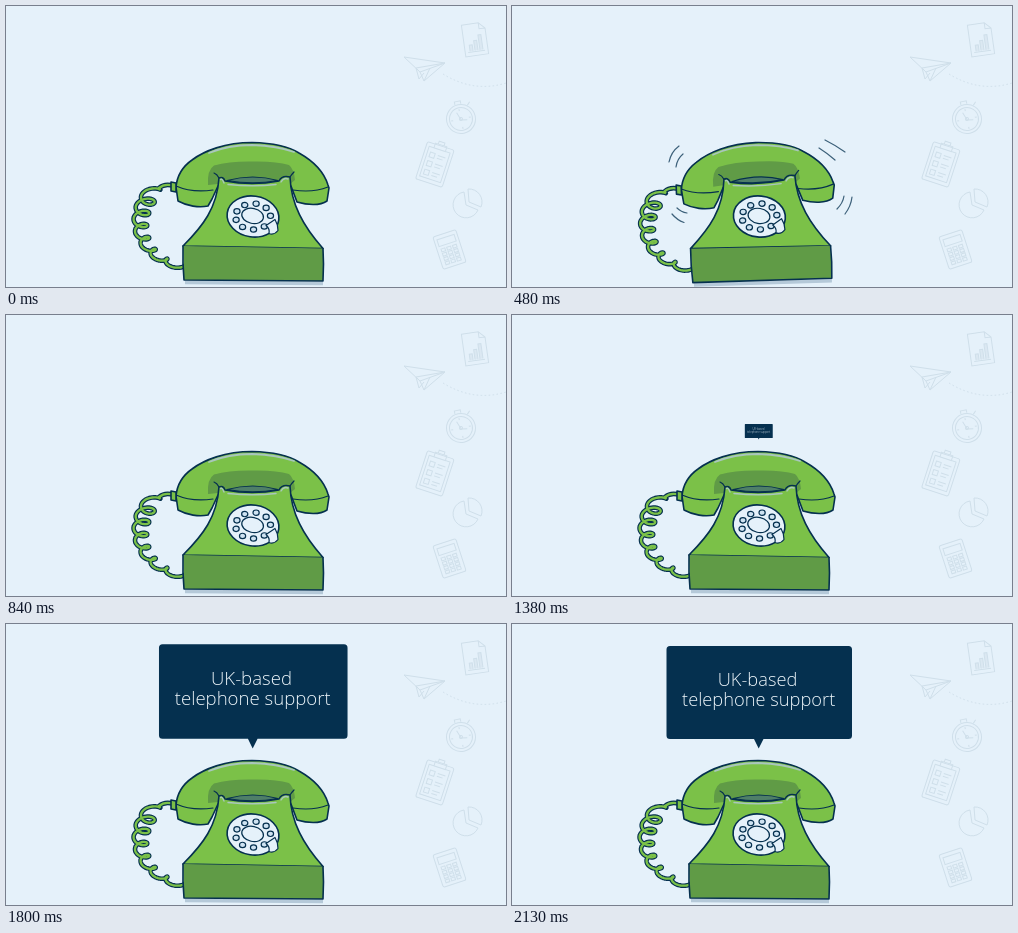
Write an HTML page that moves like this. It is 500 px wide and 281 px high and loops after 5220 ms.

```html
<!DOCTYPE html>
<html lang="en">
<head>
<meta charset="utf-8">
<title>Telephone support</title>
<style>
  html, body { margin: 0; width: 100%; height: 100%; overflow: hidden; background: #e5f1fa; }
  svg { display: block; width: 100vw; height: 100vh; }
  .icons { fill: none; stroke: #cfdfea; stroke-width: 1; }
  .ink { stroke: #05304f; stroke-width: 1.6; stroke-linejoin: round; stroke-linecap: round; }
  .thin { stroke-width: 1.2; }
  .light { fill: #7bc148; }
  .dark { fill: #609b46; }
  .pale { fill: #e5f1fa; }
  .line { fill: none; }
  .shine { fill: none; stroke: #a9c6bd; stroke-width: 1.8; stroke-linecap: round; }
  text { font: 300 18.3px "Open Sans", "Noto Sans", sans-serif; fill: #eef6fb; text-anchor: middle; }
</style>
</head>
<body>
<svg viewBox="0 0 500 281" preserveAspectRatio="none">
  <g class="icons">
    <g transform="translate(468.500 33.500) rotate(-8)">
      <path d="M-11-16H6L12-10V16H-11ZM6-16V-10H12M-8 12H9"/>
      <path d="M-6 11V5h3v6M-1 11V1h3V11M4 11V-4h3V11" fill="#dbe8f2"/>
    </g>
    <path d="M398 51L439 57L418 75L414 66ZM414 66L439 57L410 62ZM410 62L413 73L418 67M418 75L424 62"/>
    <path d="M437 68Q468 87 500 77" stroke-dasharray="1.500 2.500"/>
    <g transform="translate(455 113) rotate(-12)">
      <circle r="14.500"/><circle r="11.500"/>
      <path d="M-3-15V-18H3V-15M9-12L12-15M0 1L-3-7M0 1L6 2M0-10V-8M0 10V8M-10 0H-8M10 0H8"/>
      <circle r="1.500"/>
    </g>
    <g transform="translate(429 158) rotate(18)">
      <rect x="-14" y="-19" width="28" height="39" rx="2"/>
      <path d="M-11-15H11V16H-11ZM-6-20H6V-15H-6ZM-3-20V-23H3V-20"/>
      <path d="M-8-10h5v5h-5ZM-8-1h5v5h-5ZM-8 8h5v5h-5ZM0-9H8M0-6H6M0 0H8M0 3H6M0 9H8M0 12H6"/>
    </g>
    <path d="M460 199L458 186A13 13 0 1 0 472 204ZM463 196L462 183A13 13 0 0 1 475 201Z"/>
    <g transform="translate(443.500 243.500) rotate(-18)">
      <rect x="-12" y="-17" width="24" height="34" rx="2"/>
      <path d="M-9-13H9V-6H-9Z"/>
      <path id="keys"/>
    </g>
  </g>

  <g id="phone">
    <path d="M179 276.500L317 277.500" stroke="#b5c9d9" stroke-width="3.500"/>
    <path id="cord" class="ink line" style="stroke-width:4.600"/>
    <path id="cordFill" class="line" stroke="#7bc148" stroke-width="2.300"/>

    <path class="ink light" d="M170 181C171 170 176 161 186 154C198 145 219 136.500 246 136.500C268 137 282 140 293 147C309 156 318 166 322 179L323 182L321 195C314 200 301 199 291 196L285 180H212L206 193L202 200C193 202 181 200 172 195Z"/>
    <path class="dark" d="M202 179Q201 164 208 159.500Q224 155 247 155.500Q270 155 283 159Q288 163 289 174L284 178H212Z"/>
    <path class="ink line thin" d="M170 180Q186 187 207 184M287 184Q307 187 322 181M208 167Q211 168 213 172M288 166Q286 168 284 171"/>
    <path class="shine" d="M203 147Q222 139 246 139Q272 140 288 146"/>

    <path class="ink light" d="M213 172Q217 170 219 175Q246 180 273 175Q276 169 284 171C285 198 297 220 317 242.500L177 240C197 220 211 202 213 172Z"/>
    <path class="ink thin" fill="#4f7f68" d="M221 174.500Q247 167.500 272 174.500Q247 179 221 174.500Z"/>
    <path class="shine" d="M214.500 173.500Q216 172 218 177M275 176Q278 171 282 173M222 178.500Q247 181 270 178.500" style="stroke-width:1.400"/>
    <path class="dark" d="M177 240L317 242.500V275L178 274Z"/>
    <path class="ink line" d="M177 240Q176.500 258 178 274L317 275Q318 258 317 242.500"/>

    <g transform="translate(247 210.500)">
      <ellipse class="ink pale" rx="26" ry="20.500" transform="rotate(8)"/>
      <ellipse class="ink line thin" cx="-.5" cy="-.5" rx="11" ry="7.500" transform="rotate(12)"/>
      <g id="holes" class="ink thin" fill="#cfe3f2"></g>
      <path class="ink pale thin" d="M13 9Q19 5 22 3Q25 8 25 14Q21 19 16 17Q17 12 13 9Z"/>
    </g>
    <path class="ink light" d="M165 176L170 177V186L165 185Z"/>
  </g>

  <path id="ring" class="ink line thin" d="M157 156Q159 146 167 140M164 161Q165 153 171 148M313 134Q323 139 333 146M307 142Q315 147 323 154M332 190Q331 197 325 203M340 191Q339 200 333 208M165 202Q169 206 175 207M160 208Q165 214 172 216.500"/>

  <g id="bubble">
    <path fill="#05304f" d="M158 22H336.500Q340 22 340 25.500V111.500Q340 115 336.500 115H251.500L246.700 124.500L242 115H158Q154.500 115 154.500 111.500V25.500Q154.500 22 158 22Z"/>
    <text x="245.500" y="62">UK-based</text>
    <text x="246.700" y="82">telephone support</text>
  </g>
</svg>
<script>
const $ = id => document.getElementById(id);
const clamp = x => Math.min(1, Math.max(0, x));
const LOOP = 5220, STEP = 30;

function bezier(u, a, b, c, d) {
  const v = 1 - u;
  return v * v * v * a + 3 * v * v * u * b + 3 * v * u * u * c + u * u * u * d;
}

// Coiled cord: a circle rolling along a curve.
function cordPath() {
  let path = 'M168 180Q159 177 153 182';
  for (let i = 0; i <= 240; i++) {
    const u = i / 240, a = -0.6 - u * 7 * 2 * Math.PI, r = 9 - 5.5 * u;
    const x = bezier(u, 147, 127, 127, 176) + r * Math.cos(a);
    const y = bezier(u, 187, 206, 250, 261) + r * 0.65 * Math.sin(a);
    path += `L${x.toFixed(1)} ${y.toFixed(1)}`;
  }
  return path;
}

function build() {
  const cord = cordPath();
  $('cord').setAttribute('d', cord);
  $('cordFill').setAttribute('d', cord);

  let keys = '', holes = '';
  for (let i = 0; i < 12; i++) {
    keys += `M${-8 + i % 3 * 6} ${-3 + Math.floor(i / 3) * 4.5}h4v3h-4Z`;
  }
  for (let i = 0; i < 9; i++) {
    const a = 0.87 + i * 0.67;
    holes += `<ellipse cx="${17.5 * Math.cos(a)}" cy="${13 * Math.sin(a)}" rx="3.1" ry="2.7"/>`;
  }
  $('keys').setAttribute('d', keys);
  $('holes').innerHTML = holes;
}

function tilt(t) {
  return t < 240 || t >= 810 ? 0 : -2.7 * Math.sin((t - 210) / 200 * 2 * Math.PI);
}

function bubbleScale(t) {
  const peak = 1.057;
  if (t < 1680) return peak * Math.sin(clamp((t - 1350) / 330) * Math.PI / 2);
  return 1 + (peak - 1) * (1 - clamp((t - 1680) / 450)) ** 4;
}

function draw(now) {
  const t = Math.floor(now % LOOP / STEP) * STEP;
  const s = bubbleScale(t);
  $('phone').setAttribute('transform', `rotate(${tilt(t)} 247 200)`);
  $('ring').setAttribute('opacity', clamp((t - 210) / 360) * clamp((840 - t) / 60));
  $('bubble').setAttribute('transform', `translate(246.7 124.5) scale(${s}) translate(-246.7 -124.5)`);
  $('bubble').setAttribute('visibility', s > 0 ? 'visible' : 'hidden');
}

build();
let start;
function tick(now) {
  start ??= now;
  draw(now - start);
  requestAnimationFrame(tick);
}
draw(0);
requestAnimationFrame(tick);
</script>
</body>
</html>
```
